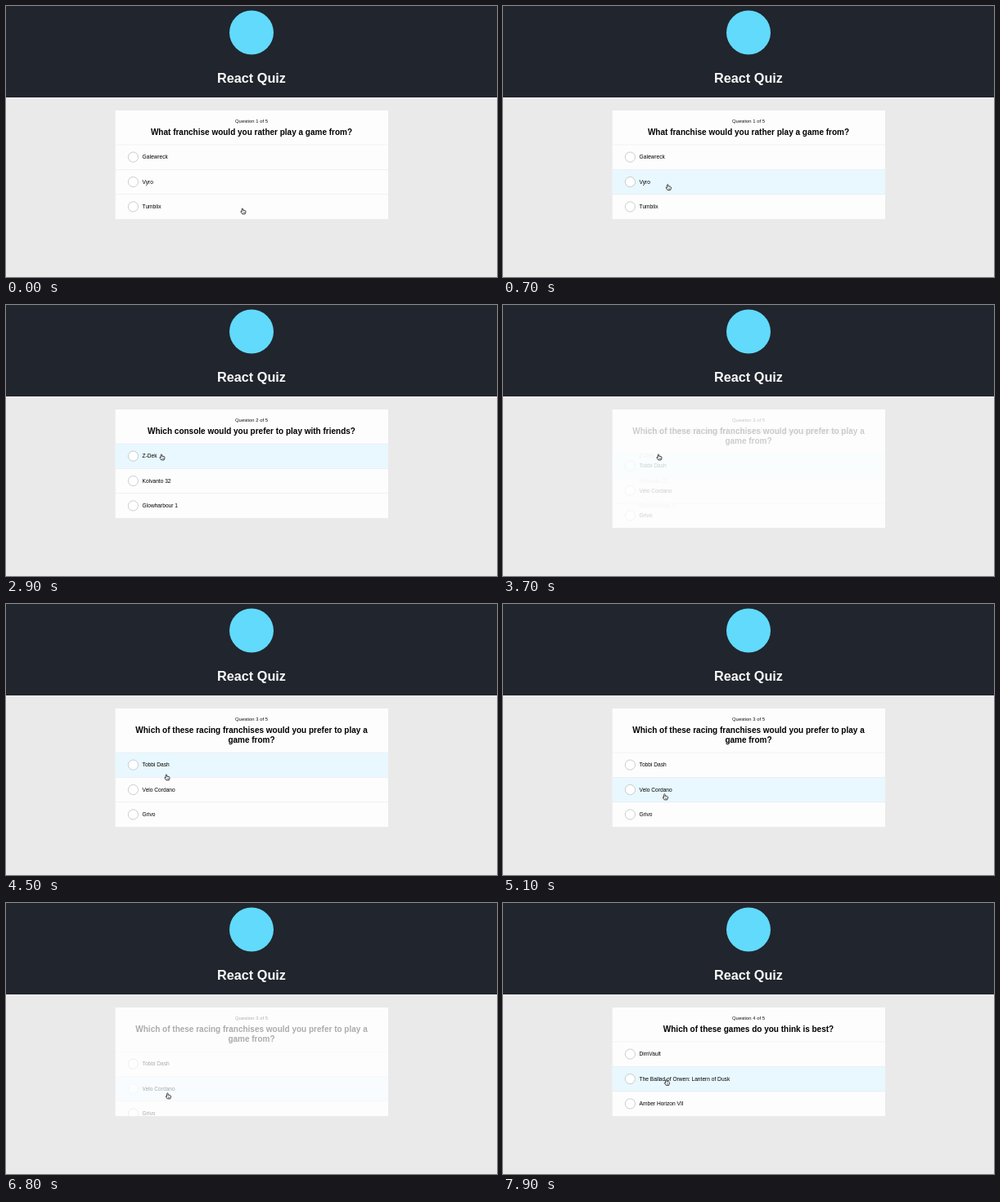
Write an HTML page with a canvas that moves like this. It is 600 px wide and 332 px high and loops after 8000 ms.

```html
<!DOCTYPE html>
<html lang="en">
<head>
<meta charset="utf-8">
<title>React Quiz</title>
<style>
html, body { margin: 0; width: 100%; height: 100%; overflow: hidden; background: #ebeaeb; }
canvas { display: block; width: 600px; height: 332px; }
</style>
</head>
<body>
<canvas id="stage"></canvas>
<script>
const LOOP = 8000, FADE = 500, DELAY = 300;
const BOX = { x: 133.5, y: 128, w: 333.5 };
const ROW = 30.4, LINE = 12;
const FONT = '"Liberation Sans", Arial, Helvetica, sans-serif';

// leave: when the card starts to fade out; the click comes shortly before
const cards = [
  { title: ['What franchise would you rather play a game from?'],
    options: ['Galewreck', 'Vyro', 'Tumblix'], pick: 1, leave: 1560 },
  { title: ['Which console would you prefer to play with friends?'],
    options: ['Z-Dek', 'Kolvanto 32', 'Glowharbour 1'], pick: 0, leave: 3260 },
  { title: ['Which of these racing franchises would you prefer to play a', 'game from?'],
    options: ['Tobbi Dash', 'Velo Cordano', 'Grivo'], pick: 1, leave: 6490 },
  { title: ['Which of these games do you think is best?'],
    options: ['DimVault', 'The Ballad of Orwen: Lantern of Dusk', 'Amber Horizon VII'],
    pick: -1, leave: Infinity }
];

// pointer path: time, x, y
const path = [
  [0, 290, 252], [200, 290, 252], [900, 181, 215.5], [2400, 181, 215.5],
  [2800, 191, 187], [3700, 191, 187], [4450, 197, 213], [4550, 197, 213],
  [4850, 198.5, 237], [7350, 198.5, 237], [7800, 200.5, 220.5], [LOOP, 200.5, 220.5]
];

const canvas = document.getElementById('stage');
const ctx = canvas.getContext('2d');
const dpr = window.devicePixelRatio || 1;
canvas.width = 600 * dpr;
canvas.height = 332 * dpr;

const clamp = v => Math.max(0, Math.min(1, v));
const ease = v => { v = clamp(v); return v * v * (3 - 2 * v); };

function rect(x, y, w, h, color) {
  ctx.fillStyle = color;
  ctx.fillRect(x, y, w, h);
}

function text(str, x, y, size, color, align = 'left', weight = 'normal') {
  ctx.font = `${weight} ${size}px ${FONT}`;
  ctx.textAlign = align;
  ctx.fillStyle = color;
  ctx.fillText(str, x, y);
}

function pointerAt(t) {
  let i = 1;
  while (i < path.length - 1 && path[i][0] < t) i++;
  const [t0, x0, y0] = path[i - 1], [t1, x1, y1] = path[i];
  const k = ease((t - t0) / (t1 - t0));
  return { x: x0 + (x1 - x0) * k, y: y0 + (y1 - y0) * k };
}

const rowsTop = card => BOX.y + 42 + (card.title.length - 1) * LINE;
const cardHeight = card => rowsTop(card) + 3 * ROW - BOX.y;

function drawRadio(y, checked) {
  ctx.beginPath();
  ctx.arc(155.4, y, 6.1, 0, Math.PI * 2);
  ctx.fillStyle = '#fff';
  ctx.fill();
  ctx.lineWidth = 0.7;
  ctx.strokeStyle = checked ? '#d8e6e6' : '#b4b8bb';
  ctx.stroke();
}

function drawCard(n, alpha, hover, checked) {
  const card = cards[n], top = rowsTop(card);
  ctx.globalAlpha = alpha;
  text(`Question ${n + 1} of 5`, 300, 143, 5.9, '#111', 'center');
  card.title.forEach((line, i) =>
    text(line, 300, 158 + i * LINE, 10, '#000', 'center', 'bold'));
  card.options.forEach((label, i) => {
    const y = top + i * ROW;
    if (i === hover) rect(BOX.x, y, BOX.w, ROW, '#e8f8fe');
    rect(BOX.x, y - 0.3, BOX.w, 0.6, '#e8e8ea');
    drawRadio(y + 15.1, i === checked);
    text(label, 166.6, y + 17.4, 6.62, '#000');
  });
  ctx.globalAlpha = 1;
}

function drawPointer({ x, y }) {
  ctx.save();
  ctx.translate(x, y - 0.8);
  ctx.scale(0.92, 0.92);
  ctx.beginPath();
  ctx.moveTo(-2, 0.8);
  ctx.lineTo(-2, -3);
  ctx.quadraticCurveTo(-1.2, -4.4, -0.4, -3);
  ctx.lineTo(-0.4, -1);
  ctx.quadraticCurveTo(2.9, -1.2, 3.3, 0.2);
  ctx.lineTo(3.1, 2);
  ctx.lineTo(2.3, 4);
  ctx.lineTo(-1.3, 4);
  ctx.lineTo(-3.5, 0.9);
  ctx.quadraticCurveTo(-3.3, -0.5, -2, 0.8);
  ctx.closePath();
  ctx.fillStyle = '#fff';
  ctx.fill();
  ctx.lineJoin = 'round';
  ctx.lineWidth = 0.9;
  ctx.strokeStyle = '#15181c';
  ctx.stroke();
  ctx.beginPath();
  for (const dx of [0, 1.4]) {
    ctx.moveTo(dx, 1);
    ctx.lineTo(dx, 3);
  }
  ctx.lineWidth = 0.5;
  ctx.stroke();
  ctx.restore();
}

function draw(t) {
  ctx.setTransform(dpr, 0, 0, dpr, 0, 0);
  rect(0, 0, 600, 332, '#ebeaeb');
  rect(0, 0, 600, 112, '#21252d');
  ctx.beginPath();
  ctx.arc(300, 32.5, 27, 0, Math.PI * 2);
  ctx.fillStyle = '#61dafb';
  ctx.fill();
  text('React Quiz', 300, 94, 16.25, '#fafafa', 'center', 'bold');

  const n = cards.findIndex(card => t < card.leave);
  const card = cards[n], prev = cards[n - 1];
  const pointer = pointerAt(t);
  // the row under the fingertip, once the pointer has moved
  const hover = t > 540 ? Math.floor((pointer.y - 4 - rowsTop(card)) / ROW) : -1;
  const age = prev ? t - prev.leave : Infinity;

  ctx.save();
  ctx.beginPath();
  ctx.rect(BOX.x, BOX.y, BOX.w, cardHeight(card));
  ctx.clip();
  rect(BOX.x, BOX.y, BOX.w, cardHeight(card), '#fefdfe');
  const shown = ease((age - DELAY) / FADE);
  if (shown > 0) drawCard(n, shown, hover, t > card.leave - 300 ? card.pick : -1);
  if (age < FADE) drawCard(n - 1, 1 - ease(age / FADE), prev.pick, prev.pick);
  ctx.restore();

  drawPointer(pointer);
}

const start = performance.now();
function tick() {
  draw((performance.now() - start) % LOOP);
  requestAnimationFrame(tick);
}
tick();
</script>
</body>
</html>
```
